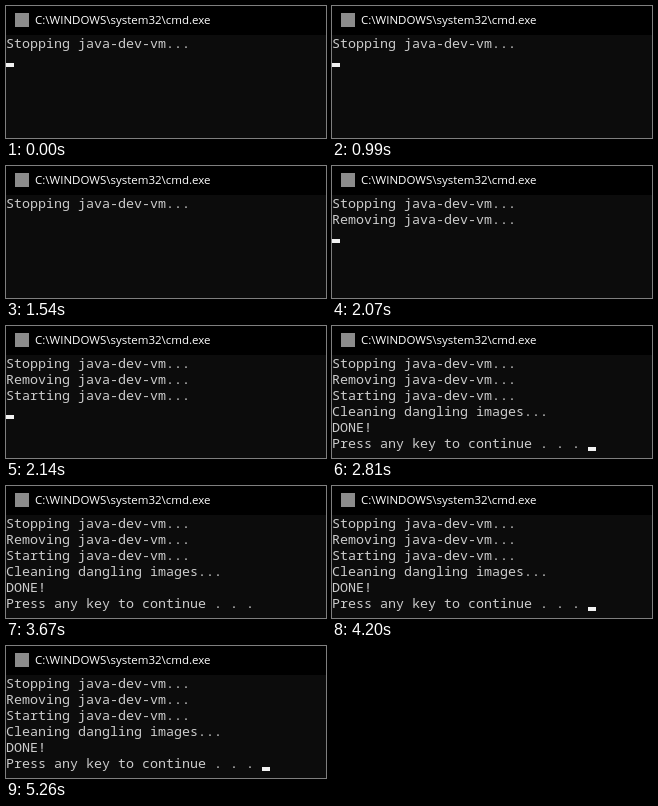
An HTML page with a canvas that plays this animation: 320x132 px, repeating every 5.74 s.

```html
<!DOCTYPE html>
<html lang="en">
<head>
<meta charset="utf-8">
<title>Console</title>
<style>
  html, body { margin: 0; width: 100%; height: 100%; overflow: hidden; background: #0c0c0c; }
  canvas { display: block; }
</style>
</head>
<body>
<canvas id="stage" width="320" height="132"></canvas>
<script>
const ctx = document.getElementById('stage').getContext('2d', { alpha: false });
const LOOP = 5740;
const BAR = 29, CELL = 8, ROW = 16, TOP = 30;

const lines = [
  'Stopping java-dev-vm...',
  'Removing java-dev-vm...',
  'Starting java-dev-vm...',
  'Cleaning dangling images...',
  'DONE!',
  'Press any key to continue . . . '
];

// When each line count begins, and when the cursor toggles.
const prints = [[0, 1], [2070, 2], [2140, 3], [2740, 4], [2810, 6]];
const blinks = [[0, true], [530, false], [990, true], [1540, false], [2070, true],
  [3670, false], [4200, true], [4730, false], [5260, true]];

const valueAt = (steps, t) => steps.filter(([start]) => start <= t).pop()[1];

function box(color, x, y, w, h) {
  ctx.fillStyle = color;
  ctx.fillRect(x, y, w, h);
}

function drawTitleBar() {
  box('#000', 0, 0, 320, BAR);
  box('#8c8c8c', 9, 7, 14, 14);
  ctx.font = '11.5px "Open Sans", "Noto Sans", sans-serif';
  ctx.fillStyle = '#fff';
  ctx.fillText('C:\\WINDOWS\\system32\\cmd.exe', 29, 18);
}

function drawConsole(t) {
  const count = valueAt(prints, t);
  ctx.font = '500 13.333px "Noto Sans Mono", "DejaVu Sans Mono", monospace';
  ctx.fillStyle = '#ccc';
  lines.slice(0, count).forEach((line, i) => ctx.fillText(line, 0, TOP + i * ROW + 12));

  if (valueAt(blinks, t)) {
    const waiting = count === lines.length;
    const row = waiting ? count - 1 : count;
    const column = waiting ? lines[row].length : 0;
    box('#f2f2f2', column * CELL, TOP + row * ROW + 11, CELL, 4);
  }
}

function draw() {
  const t = performance.now() % LOOP;
  box('#0c0c0c', 0, 0, 320, 132);
  drawTitleBar();
  drawConsole(t);
  requestAnimationFrame(draw);
}

draw();
</script>
</body>
</html>
```
